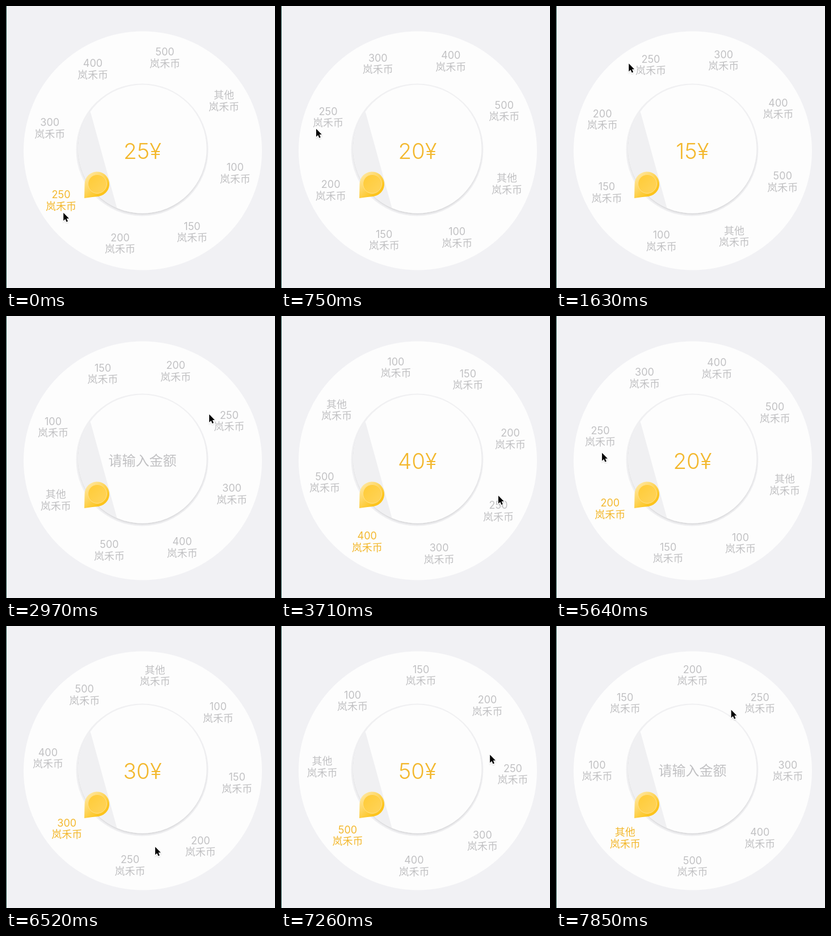
Recreate the animation shown at these times as an HTML page. Size 474 px wide and 496 px high, loop 7990 ms.

```html
<!DOCTYPE html>
<html lang="zh-CN">
<head>
<meta charset="utf-8">
<title>Amount dial</title>
<style>
  html, body { margin: 0; width: 100%; height: 100%; overflow: hidden; background: #f1f1f4; }
  svg { display: block; width: 474px; height: 496px; }
  text { font: 18px Inter, "Noto Sans CJK SC", "Noto Sans CJK", sans-serif; text-anchor: middle; fill: #c1c1c3; }
  .coin { font-weight: 300; }
  .active text, #amount { fill: #f3b82e; }
  #amount { font-size: 38.5px; font-weight: 300; }
  #amount.prompt { font-size: 24px; fill: #c1c1c3; }
</style>
</head>
<body>
<svg viewBox="0 0 474 496">
  <defs>
    <linearGradient id="gold" x1="0" y1="0" x2=".85" y2="1">
      <stop offset=".1" stop-color="#ffe8a4"/>
      <stop offset=".8" stop-color="#fdc41c"/>
    </linearGradient>
    <linearGradient id="face" x1="0" y1="0" x2="1" y2="1">
      <stop offset="0" stop-color="#ffcb35"/>
      <stop offset="1" stop-color="#ffd45c"/>
    </linearGradient>
    <filter id="soft" x="-20%" y="-20%" width="140%" height="140%">
      <feDropShadow dx="0" dy="2" stdDeviation="1.2" flood-opacity=".11"/>
    </filter>
    <clipPath id="disc"><circle cx="240.5" cy="251.5" r="113"/></clipPath>
  </defs>
  <rect width="1" height="496" fill="#16483f"/>
  <circle cx="241" cy="254.5" r="210" fill="#fdfdfd"/>
  <g id="labels"></g>
  <circle cx="240" cy="253" r="116.5" fill="#f0f0f2"/>
  <circle cx="240.5" cy="251.5" r="113" fill="#fdfdfd" filter="url(#soft)"/>
  <path d="M120 187H149L196 357V370H120Z" fill="#f0f0f2" clip-path="url(#disc)"/>
  <path d="M138 338L138.5 313A21.8 21.8 0 1 1 164 334.7Q150 336 138 338Z" fill="url(#gold)"/>
  <circle cx="161" cy="313" r="16.5" fill="url(#face)" stroke="#ffe08a"/>
  <text id="amount" x="240.5"></text>
  <path id="cursor" d="M0 0V14L3.2 11 5.4 16 7.8 15 5.6 10H9.8Z"
        stroke="#fff" paint-order="stroke" stroke-width="2" filter="url(#soft)"/>
</svg>
<script>
const LOOP = 7990, STEP = 148.2, LAST_STEP = 53;
const CENTER = { x: 240.5, y: 254.5 }, RADIUS = 168;
const SELECT_ANGLE = 135, SELECT_RANGE = 15.5;
const OTHER = '其他', COIN = '岚禾币';
const values = [100, 150, 200, 250, 300, 400, 500, OTHER];

// step, dial angle (deg), dial speed (deg/step), cursor lead (deg), cursor radius
const drag = [
  [0,  13.6,  13, 128.3, 177],
  [11, 109,   7,  124.8, 190],
  [20, 200.4, 7,  124.9, 143],
  [30, 328.4, 13, 128,   167.5],
  [38, 419.8, 6,  125.1, 160],
  [44, 322.5, -20, 118,  136],
  [53, 180,   -6, 122.5, 127],
];

const byId = id => document.getElementById(id);
const mix = (a, b, k) => a + (b - a) * k;
const polar = (deg, r) => {
  const a = deg * Math.PI / 180;
  return [CENTER.x + r * Math.cos(a), CENTER.y + r * Math.sin(a)];
};
const moveTo = (node, [x, y]) => node.setAttribute('transform', `translate(${x.toFixed(1)} ${y.toFixed(1)})`);
const signedAngle = deg => ((deg + 180) % 360 + 360) % 360 - 180;

byId('labels').innerHTML = values.map(v =>
  `<g><text y="-4">${v}</text><text class="coin" y="16.5">${COIN}</text></g>`).join('');
const labels = [...byId('labels').children];
const amount = byId('amount');

function pose(step) {
  let i = 0;
  while (i < drag.length - 2 && step >= drag[i + 1][0]) i++;
  const [s0, a0, v0, lead0, r0] = drag[i], [s1, a1, v1, lead1, r1] = drag[i + 1];
  const d = s1 - s0, k = (step - s0) / d, smooth = k * k * (3 - 2 * k);
  const angle = mix(a0, a1, smooth) + d * k * (1 - k) * (v0 * (1 - k) - v1 * k);
  return { angle, cursor: polar(angle + mix(lead0, lead1, k), mix(r0, r1, smooth)) };
}

function render(now) {
  const step = Math.min(LAST_STEP, Math.floor((now % LOOP + 5) / STEP));
  const { angle, cursor } = pose(step);
  let nearest = 0, best = 360;
  labels.forEach((label, i) => {
    const at = angle + 45 * i, gap = Math.abs(signedAngle(at - SELECT_ANGLE));
    moveTo(label, polar(at, RADIUS));
    label.classList.toggle('active', gap < SELECT_RANGE);
    if (gap < best) [best, nearest] = [gap, i];
  });
  const value = values[nearest], prompt = value === OTHER;
  amount.textContent = prompt ? '请输入金额' : value / 10 + '¥';
  amount.classList.toggle('prompt', prompt);
  amount.setAttribute('y', prompt ? 263 : 269);
  moveTo(byId('cursor'), cursor);
}

function tick() {
  render(performance.now());
  requestAnimationFrame(tick);
}
tick();
</script>
</body>
</html>
```
